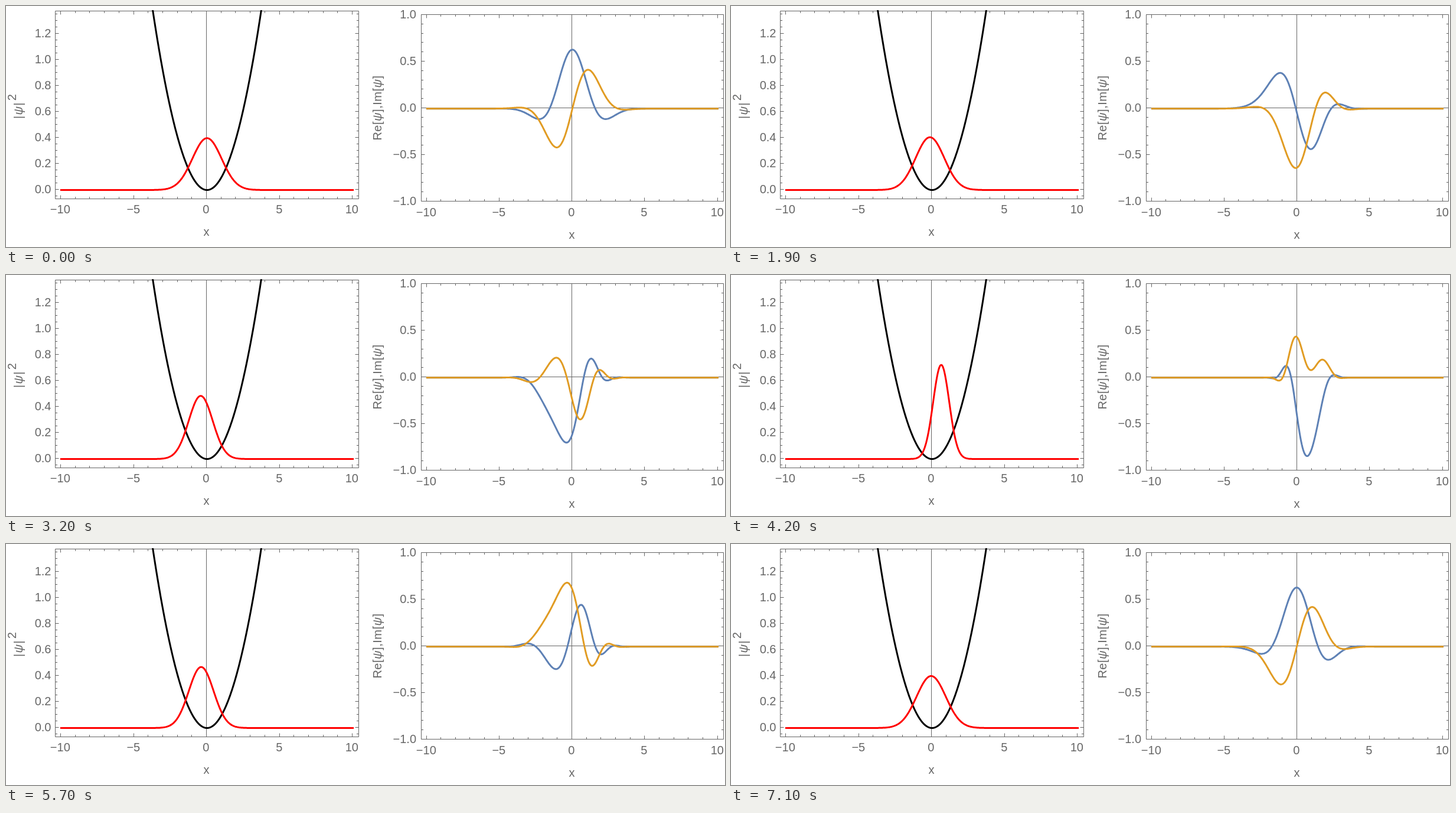
Write an HTML page that moves like this. It is 1218x408 px and loops after 7.2 s.

```html
<!DOCTYPE html>
<html lang="en">
<head>
<meta charset="utf-8">
<title>Wave packet in a harmonic well</title>
<style>
html, body { margin: 0; width: 100%; height: 100%; overflow: hidden; background: #fff; }
svg { display: block; }
text { font: 20px "Liberation Sans", Arial, sans-serif; fill: #666; }
.psi { font-style: italic; }
.axes { stroke: #666; fill: none; }
.curve { fill: none; stroke-width: 3; stroke-linecap: square; stroke-linejoin: round; }
</style>
</head>
<body>
<svg width="1218" height="408" viewBox="0 0 1218 408">
  <clipPath id="well"><rect x="83" y="7" width="515" height="320"/></clipPath>
  <g id="plots"></g>
  <text transform="translate(28 191) rotate(-90)" letter-spacing="1.3">|<tspan class="psi">ψ</tspan>|<tspan dx="2" dy="-11">2</tspan></text>
  <text transform="translate(636 172.5) rotate(-90)" text-anchor="middle" letter-spacing=".5">Re[<tspan class="psi">ψ</tspan>],Im[<tspan class="psi">ψ</tspan>]</text>
  <path id="potential" class="curve" stroke="#000" clip-path="url(#well)"/>
  <path id="density" class="curve" stroke="#f00"/>
  <path id="real" class="curve" stroke="#5e81b5"/>
  <path id="imag" class="curve" stroke="#e19c24"/>
</svg>
<script>
const FRAMES = 72, FRAME_MS = 100, PHASE_STEP = 0.17585;
const M_OMEGA = Math.SQRT2, BETA = 0.5 / M_OMEGA;   // oscillator scale, relative squeezing
const byId = id => document.getElementById(id);
const snap = v => Math.floor(v) + 0.5;
const label = (v, digits) => v.toFixed(digits).replace('-', '\u2212');

const left = {
  x0: 83.5, x1: 597.5, y0: 8.5, y1: 326.5,
  cx: 339.5, sx: 24.7, cy: 310.5, sy: 220,
  minor: 0.05, major: 4, from: -1, to: 27, textX: 76.5, textY: 351,
  curveX: 340.5, curveSX: 24.71, curveY: 311.5
};
const right = {
  x0: 703.5, x1: 1215.5, y0: 14.5, y1: 330.5,
  cx: 958.5, sx: 24.65, cy: 172.5, sy: 158,
  minor: 0.1, major: 5, from: -10, to: 10, textX: 695, textY: 356,
  curveX: 959.5, curveSX: 24.61, curveY: 173.7
};

function axes(p) {
  let d = `M${p.x0} ${p.y0}H${p.x1}V${p.y1}H${p.x0}ZM${p.cx} ${p.y0}V${p.y1}`;
  let texts = '';
  for (let i = -10; i <= 10; i++) {
    const big = i % 5 === 0, len = big ? 6 : 3.5, x = snap(p.cx + i * p.sx);
    d += `M${x} ${p.y0}v${len}M${x} ${p.y1}v${-len}`;
    if (big) texts += `<text x="${x - 0.7}" y="${p.textY}" text-anchor="middle">${label(i, 0)}</text>`;
  }
  for (let i = p.from; i <= p.to; i++) {
    const big = i % p.major === 0, len = big ? 6 : 3.5, y = snap(p.cy - i * p.minor * p.sy);
    d += `M${p.x0} ${y}h${len}M${p.x1} ${y}h${-len}`;
    if (big) texts += `<text x="${p.textX}" y="${y + 6.5}" text-anchor="end">${label(i * p.minor, 1)}</text>`;
  }
  texts += `<text x="${p.cx}" y="${p.textY + 38}" text-anchor="middle">x</text>`;
  return `<path class="axes" d="${d}"/>${texts}`;
}

function plot(id, p, f) {
  const points = [];
  for (let i = -200; i <= 200; i++) {
    const x = i / 20;
    points.push((p.curveX + x * p.curveSX).toFixed(2) + ' ' + (p.curveY - f(x) * p.sy).toFixed(2));
  }
  byId(id).setAttribute('d', 'M' + points.join('L'));
}

// Exact squeezed Gaussian packet with unit initial momentum; returns [modulus, argument].
function packet(theta) {
  const c = Math.cos(theta), s = Math.sin(theta);
  const re = c, im = BETA * s, n = re * re + im * im;
  let turn = Math.atan2(im, re);
  turn += 2 * Math.PI * Math.round((theta - turn) / (2 * Math.PI));
  const norm = (2 * Math.PI * n) ** -0.25;
  return x => {
    // exponent = (a + ib) / (re + i im)
    const a = -M_OMEGA / 2 * BETA * c * x * x;
    const b = -M_OMEGA / 2 * s * x * x + x - s / (2 * M_OMEGA);
    return [
      norm * Math.exp((a * re + b * im) / n),
      (b * re - a * im) / n - turn / 2
    ];
  };
}

function draw(frame) {
  const psi = packet(frame * PHASE_STEP);
  plot('density', left, x => psi(x)[0] ** 2);
  plot('real', right, x => { const [r, a] = psi(x); return r * Math.cos(a); });
  plot('imag', right, x => { const [r, a] = psi(x); return r * Math.sin(a); });
}

byId('plots').innerHTML = axes(left) + axes(right) +
  `<path class="axes" d="M${right.x0} ${right.cy}H${right.x1}"/>`;
plot('potential', left, x => 0.1 * x * x);

const start = performance.now();
function tick() {
  draw(Math.floor((performance.now() - start) / FRAME_MS) % FRAMES);
  requestAnimationFrame(tick);
}
tick();
</script>
</body>
</html>
```
